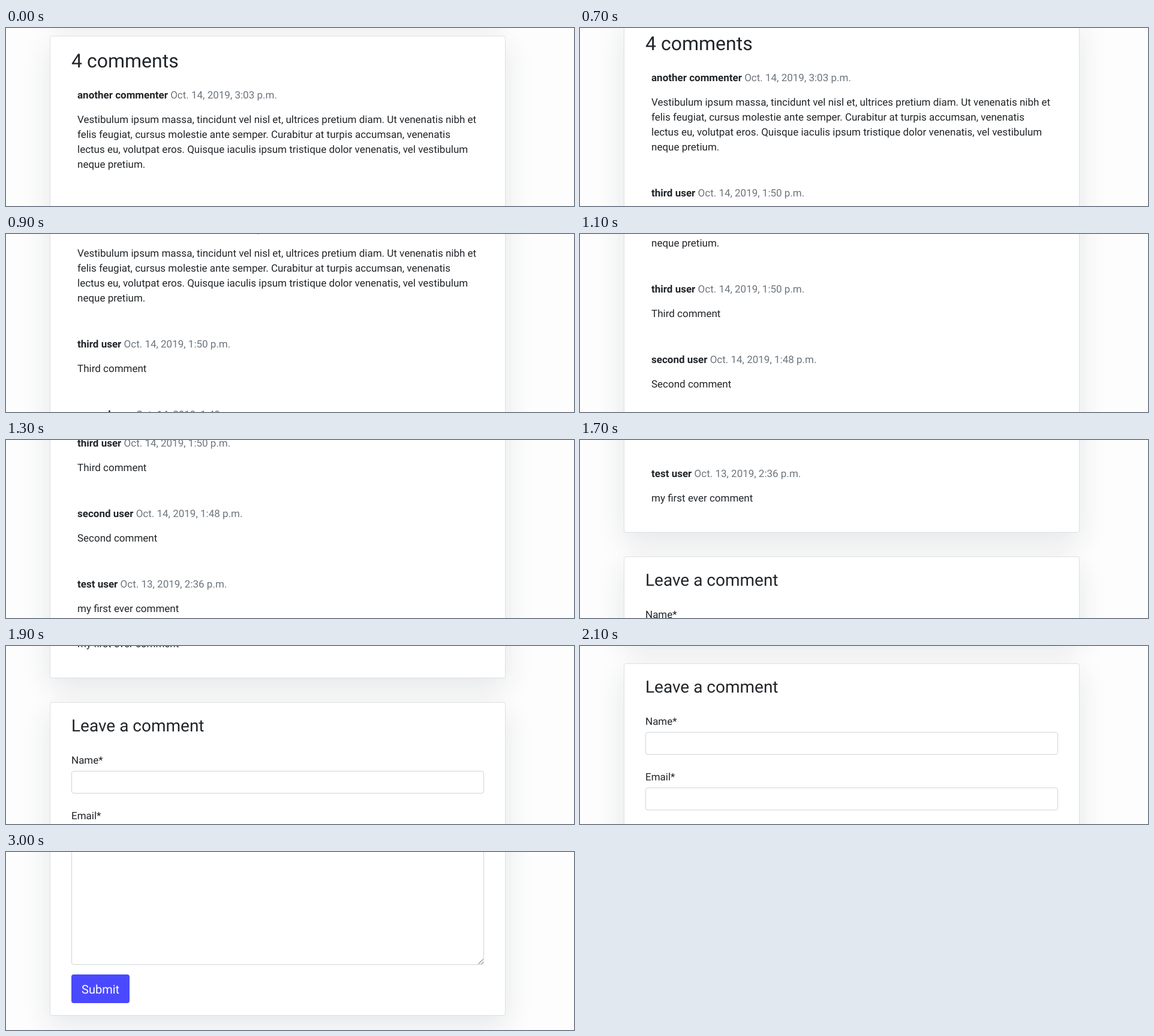
These frames come from a looping animation (947x298 px, 4500 ms). An HTML page:

```html
<!DOCTYPE html>
<html lang="en">
<head>
<meta charset="utf-8">
<title>Comments</title>
<style>
  html, body {
    margin: 0;
    width: 100%;
    height: 100%;
    overflow: hidden;
    background: #fdfdfd;
  }
  .stage {
    position: relative;
    width: 100%;
    height: 100%;
    overflow: hidden;
    overflow: clip;
    contain: strict;
  }
  .page {
    position: absolute;
    top: 0;
    left: 0;
    width: 947px;
    height: 1400px;
    animation: scroll 4500ms step-end infinite;
  }
  .card, .field, .button {
    position: absolute;
    box-sizing: border-box;
    border-radius: 4px;
  }
  .card {
    left: 73px;
    width: 760px;
    background: #fff;
    border: 1px solid #dcdfe2;
    box-shadow: 0 16px 48px rgba(31, 45, 61, .11);
  }
  .field {
    left: 109px;
    width: 688px;
    height: 38px;
    background: #fff;
    border: 1px solid #ced4da;
  }
  .button {
    left: 109px;
    top: 1251px;
    width: 97px;
    height: 48px;
    background: #4a49ff;
  }
  svg {
    position: absolute;
    top: 0;
    left: 0;
    font: 17px Roboto, sans-serif;
    fill: #212529;
    text-rendering: geometricPrecision;
  }
  .bold { font-weight: 700; }
  .date { fill: #6c757d; }
  .grip { stroke: #555; stroke-width: 1; }

  /* Page scroll: one jump every 100 ms, a pause, then the form's end */
  @keyframes scroll {
    0% { transform: translateY(0); }
    15.555% { transform: translateY(-29px); }
    17.777% { transform: translateY(-75px); }
    19.999% { transform: translateY(-121px); }
    22.222% { transform: translateY(-167px); }
    24.444% { transform: translateY(-213px); }
    26.666% { transform: translateY(-257px); }
    28.888% { transform: translateY(-300px); }
    31.111% { transform: translateY(-342px); }
    33.333% { transform: translateY(-385px); }
    35.555% { transform: translateY(-435px); }
    37.777% { transform: translateY(-485px); }
    39.999% { transform: translateY(-539px); }
    42.222% { transform: translateY(-586px); }
    44.444% { transform: translateY(-632px); }
    46.666% { transform: translateY(-651px); }
    66.666%, 100% { transform: translateY(-1046px); }
  }
</style>
</head>
<body>
<div class="stage">
<div class="page">
  <!-- The card above the view only casts its shadow -->
  <div class="card" style="top:-227px;height:200px"></div>
  <div class="card" style="top:13px;height:627px"></div>
  <div class="card" style="top:680px;height:640px"></div>
  <div class="field" style="top:795px"></div>
  <div class="field" style="top:888px"></div>
  <div class="field" style="top:981px;height:254px"></div>
  <div class="button"></div>

  <svg width="947" height="1400">
    <text x="109" y="66" font-size="32">4 comments</text>

    <text x="119" y="118"><tspan class="bold">another commenter</tspan> <tspan class="date">Oct. 14, 2019, 3:03 p.m.</tspan></text>
    <text x="119" y="159">Vestibulum ipsum massa, tincidunt vel nisl et, ultrices pretium diam. Ut venenatis nibh et</text>
    <text x="119" y="184">felis feugiat, cursus molestie ante semper. Curabitur at turpis accumsan, venenatis</text>
    <text x="119" y="209">lectus eu, volutpat eros. Quisque iaculis ipsum tristique dolor venenatis, vel vestibulum</text>
    <text x="119" y="234">neque pretium.</text>

    <text x="119" y="311"><tspan class="bold">third user</tspan> <tspan class="date">Oct. 14, 2019, 1:50 p.m.</tspan></text>
    <text x="119" y="352">Third comment</text>

    <text x="119" y="429"><tspan class="bold">second user</tspan> <tspan class="date">Oct. 14, 2019, 1:48 p.m.</tspan></text>
    <text x="119" y="470">Second comment</text>

    <text x="119" y="547"><tspan class="bold">test user</tspan> <tspan class="date">Oct. 13, 2019, 2:36 p.m.</tspan></text>
    <text x="119" y="588">my first ever comment</text>

    <text x="109" y="729" font-size="28">Leave a comment</text>
    <text x="109" y="783">Name*</text>
    <text x="109" y="876">Email*</text>

    <path class="grip" d="M787.5 1233.5l8-8M792.5 1233.5l3-3"/>
    <text x="126" y="1283" font-size="20" fill="#fff">Submit</text>
  </svg>
</div>
</div>
</body>
</html>
```
